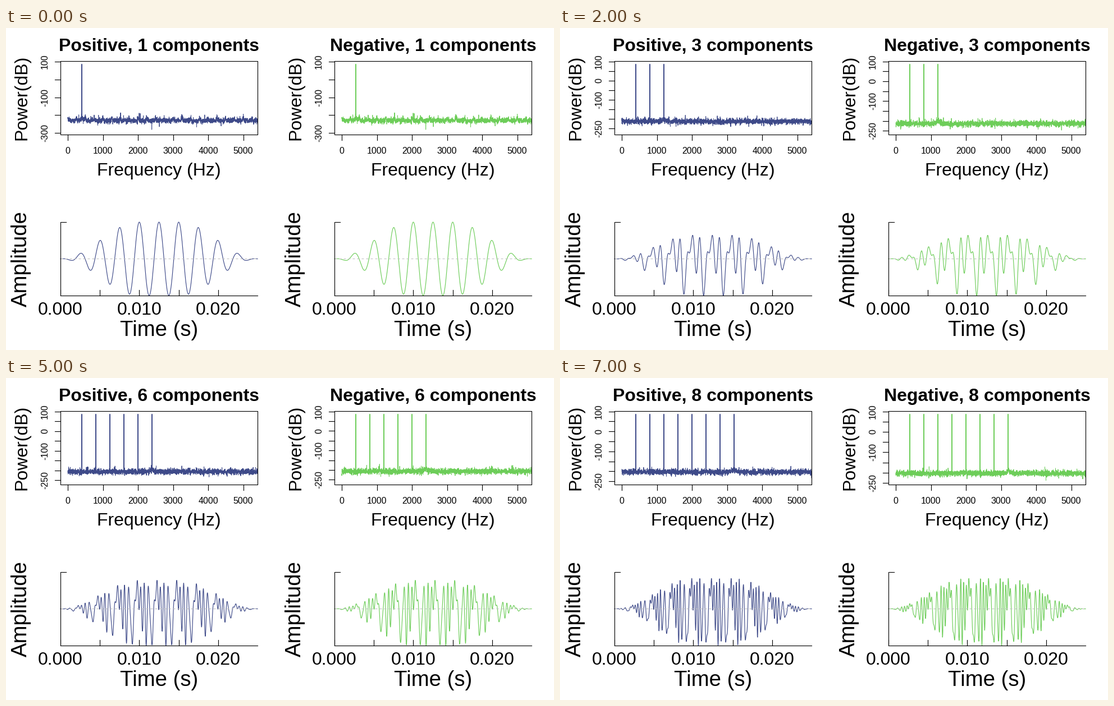
Animation of 976x574 px, one loop 8 s. Source, as a matplotlib script:

```python
import numpy as np
import matplotlib.pyplot as plt
from matplotlib.animation import FuncAnimation

W, H, DPI = 976, 574, 100
PX = 72 / DPI                      # points per pixel
plt.rcParams["font.family"] = "Liberation Sans"

F0 = 400                           # fundamental, Hz
DUR, RAMP = 0.025, 0.010           # tone length and ramp, s
LEFT, RIGHT = 97, 448              # plot edges inside a panel
TOP, BOTTOM = 59, 190              # spectrum box
W_TOP, W_MID, W_BOT = 346, 411.5, 477   # waveform axes
PEAK, PEAK_Y = 86.87, 64.3         # level of a component, dB and pixels

# per number of components: noise floor (dB) and pixels per dB
FLOOR = [-229, -218, -214, -210, -208, -207, -205, -203]
SCALE = {
    +1: [.3175, .344, .340, .345, .344, .350, .3556, .356],
    -1: [.3175, .347, .353, .346, .344, .3475, .350, .3645],
}
PANELS = [(0, "Positive", +1, "#3E4A89"), (488, "Negative", -1, "#6DCD59")]

fig = plt.figure(figsize=((W + .01) / DPI, (H + .01) / DPI), dpi=DPI,
                 facecolor="white")
ax = fig.add_axes([0, 0, 1, 1])


def line(x, y, color="black", width=1.15, **kw):
    ax.plot(x, y, color=color, lw=width * PX, solid_joinstyle="round", **kw)


def text(x, y, s, size, upright=False, **kw):
    ax.text(x, y, s, fontsize=size * PX, ha="center", va="baseline",
            rotation=90 if upright else 0, rotation_mode="anchor", **kw)


def freq_x(f):
    return 110 + f * 0.0625


def time_x(t):
    return LEFT + t / DUR * (RIGHT - LEFT)


def tone(n, sign):
    """Schroeder-phase complex of n components with raised-cosine ramps."""
    t = np.linspace(0, DUR, 1103)
    k = np.arange(1, n + 1)[:, None]
    wave = np.cos(2 * np.pi * k * F0 * t
                  + sign * np.pi * k * (k - 1) / n).sum(axis=0)
    edge = np.clip(np.minimum(t, DUR - t) / RAMP, 0, 1)
    wave *= np.sin(np.pi / 2 * edge) ** 2
    return t, wave / np.abs(wave).max()


def spectrum(n, sign):
    """Rounding-noise floor with one sharp line per component."""
    rng = np.random.default_rng(40 + n if n == 1 else 40 + n + 20 * sign)
    f = np.arange(0, 5408, 2)
    db = FLOOR[n - 1] + rng.normal(0, 7.3, f.size)
    db += np.where(rng.random(f.size) < .012, rng.uniform(8, 24, f.size), 0)
    db -= np.where(rng.random(f.size) < .002, rng.uniform(10, 28, f.size), 0)
    if n == 1:
        gap = np.abs((f + 125) % 250 - 125)
        db += 20 * np.exp(-gap / 14) - 2
    db += 16 * np.exp(-np.abs(f - n * F0) / 50)
    db[F0 // 2:n * F0 // 2 + 1:F0 // 2] = PEAK
    return f, db


def draw_spectrum(dx, n, sign, color):
    scale = SCALE[sign][n - 1]

    def level_y(v):
        return PEAK_Y + (PEAK - v) * scale

    f, db = spectrum(n, sign)
    line(dx + freq_x(f), level_y(db), color, 1)
    x0, x1 = dx + LEFT, dx + RIGHT
    line([x0, x1, x1, x0, x0], [TOP, TOP, BOTTOM, BOTTOM, TOP])

    for v in range(0, 5001, 1000):
        x = dx + freq_x(v)
        line([x, x], [BOTTOM, BOTTOM + 9.6])
        text(x, 224, str(v), 16)

    if n == 1:
        ticks, labels = range(-300, 101, 100), (-300, -100, 100)
    else:
        ticks, labels = range(-250, 101, 50), (-250, -100, 0, 100)
    for v in ticks:
        y = level_y(v)
        line([x0 - 9.6, x0], [y, y])
        if v in labels:
            text(dx + 74, y, str(v), 16, upright=True)

    text(dx + 36, 124.5, "Power(dB)", 32, upright=True)
    text(dx + 272.5, 263, "Frequency (Hz)", 32)


def draw_wave(dx, n, sign, color):
    t, wave = tone(n, sign)
    line(dx + time_x(t), W_MID - wave * (W_BOT - W_MID), color, 1.15)
    x0, x1 = dx + LEFT, dx + RIGHT
    line([x0, x1], [W_MID, W_MID], "#BEBEBE", 1, dashes=(4, 4))
    line([x0 + 9.6, x0, x0, x1], [W_TOP, W_TOP, W_BOT, W_BOT])
    for i in range(5):
        x = dx + time_x(i * .005)
        line([x, x], [W_BOT, W_BOT - 9.6])
        if i % 2 == 0:
            text(x, 511, f"{i * .005:.3f}", 32)
    text(dx + 37, 411.5, "Amplitude", 38.4, upright=True)
    text(dx + 272.5, 549, "Time (s)", 38.4)


def draw(i):
    n = i + 1
    ax.clear()
    ax.axis("off")
    for dx, name, sign, color in PANELS:
        text(dx + 272.5, 41, f"{name}, {n} components", 32, weight="bold")
        draw_spectrum(dx, n, sign, color)
        draw_wave(dx, n, sign, color)
    ax.set_xlim(0, W)
    ax.set_ylim(H, 0)
    return []


anim = FuncAnimation(fig, draw, frames=8, interval=1000, repeat=True,
                     repeat_delay=0, init_func=lambda: [])
plt.show()
```
